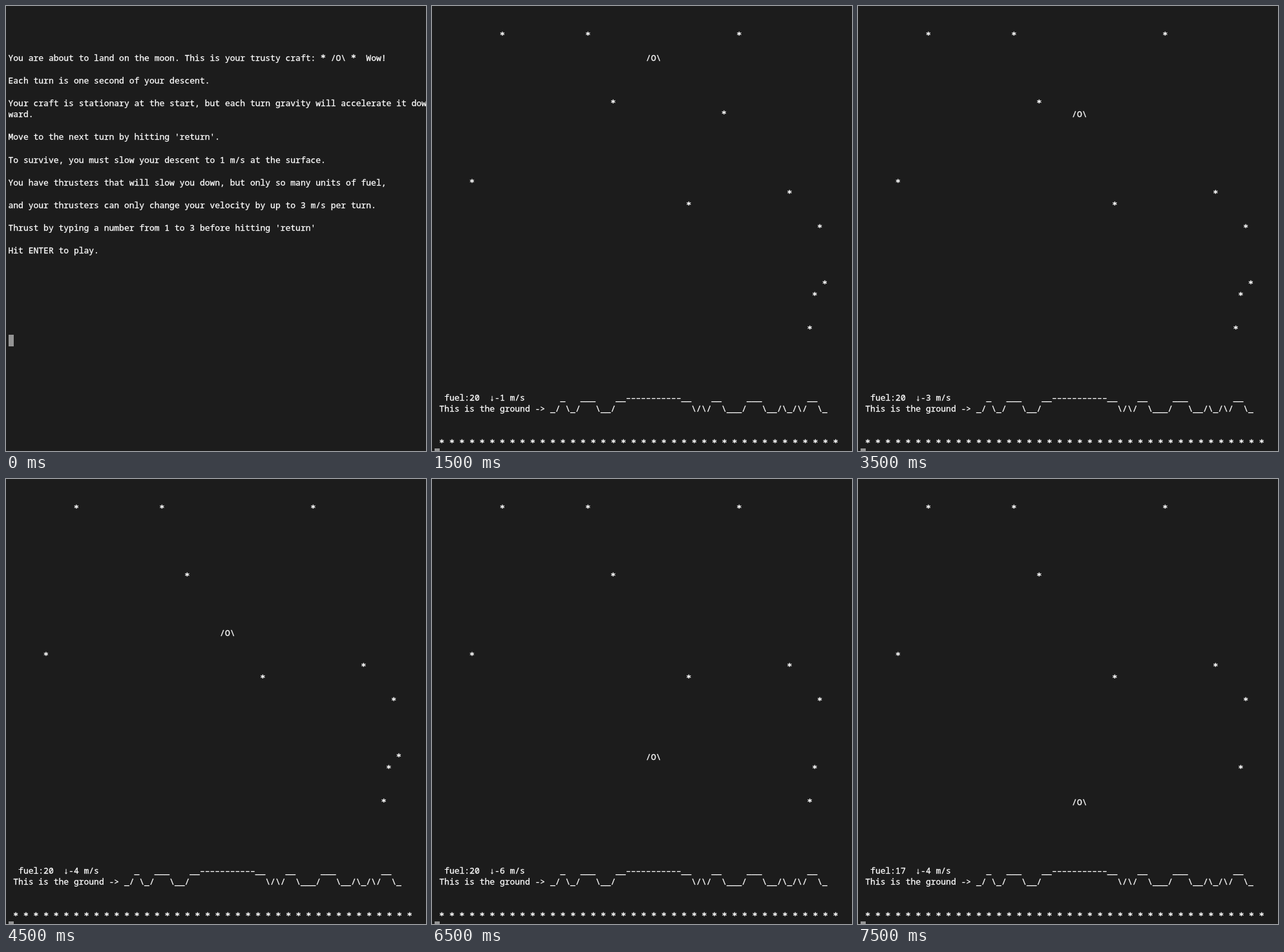
An HTML page that plays this animation: 650 by 689 pixels, repeating every 8 s.

```html
<!DOCTYPE html>
<html lang="en">
<head>
<meta charset="utf-8">
<title>Moon lander</title>
<style>
  html, body { margin: 0; width: 100%; height: 100%; overflow: hidden; background: #1c1c1c; }
  #stage { position: absolute; inset: 0; overflow: hidden; contain: strict; }
  #screen {
    position: absolute; inset: 1.6px 0 0 3.5px; margin: 0; overflow: hidden;
    font: 500 13px/17.53px "Noto Sans Mono", "DejaVu Sans Mono", monospace;
    font-variant-ligatures: none;
    -webkit-text-stroke: .3px #fff;
    color: #fff; white-space: pre;
  }
  /* heavy six-pointed asterisk */
  #screen b {
    position: relative; top: -1px;
    font: bold 13px/0 "DejaVu Sans Mono", monospace; letter-spacing: -.026px;
  }
  #cursor { position: absolute; width: 8px; height: 17.5px; background: #949494; }
</style>
</head>
<body>
<div id="stage">
  <div id="cursor"></div>
  <pre id="screen"></pre>
</div>
<script>
const LOOP = 8000, COL = 7.8, ROW = 17.53, ROWS = 39;
const screenEl = document.getElementById('screen');
const cursor = document.getElementById('cursor');

const intro = [
  [4, 'You are about to land on the moon. This is your trusty craft: * /O\\ *  Wow!'],
  [6, 'Each turn is one second of your descent.'],
  [8, 'Your craft is stationary at the start, but each turn gravity will accelerate it dow'],
  [9, 'ward.'],
  [11, "Move to the next turn by hitting 'return'."],
  [13, 'To survive, you must slow your descent to 1 m/s at the surface.'],
  [15, 'You have thrusters that will slow you down, but only so many units of fuel,'],
  [17, 'and your thrusters can only change your velocity by up to 3 m/s per turn.'],
  [19, "Thrust by typing a number from 1 to 3 before hitting 'return'"],
  [21, 'Hit ENTER to play.']
];

// [row, column]
const stars = [
  [2, 13], [2, 30], [2, 60], [4, 36], [8, 35], [9, 57], [15, 7],
  [16, 70], [17, 50], [19, 76], [24, 77], [25, 75], [28, 74]
];
const peaks = '_   ___    __' + '–'.repeat(11) + '__    __     ___         __';
const ground = 'This is the ground -> _/ \\_/   \\__/' + ' '.repeat(15) +
  '\\/\\/  \\___/   \\__/\\_/\\/  \\_';

// One speed per turn; each adds to the craft's row.
const speeds = [0, 1, 2, 3, 4, 5, 6, 4];
const craftRows = [];
speeds.reduce((row, v) => (craftRows.push(row + v), row + v), 3);

function show(parts) {
  const lines = Array(ROWS).fill('');
  for (const [row, col, text] of parts) lines[row] = lines[row].padEnd(col) + text;
  screenEl.innerHTML = lines.join('\n').replace(/\*/g, '<b>*</b>');
}

function drawTurn(turn) {
  const v = speeds[turn];
  const fuel = turn === 7 ? 17 : 20;
  const passed = craftRows.slice(0, turn + 1);
  show([
    ...stars.filter(([row]) => !passed.includes(row)).map(([row, col]) => [row, col, '*']),
    [craftRows[turn], 42, '/O\\'],
    [34, 2, 'fuel:' + fuel],
    [34, 11, (v ? '↓-' : '  ') + v + ' m/s'],
    [34, 25, peaks],
    [35, 1, ground],
    [38, 1, '* '.repeat(40)]
  ]);
}

function placeCursor(t) {
  const row = t < 500 ? 29 : 39;
  const typed = t >= 7300 && t < 7500;
  const hidden = t >= 6300 && t < 6500;
  cursor.style.left = 4 + (typed ? COL : 0) + 'px';
  cursor.style.top = 1.1 + row * ROW + 'px';
  cursor.style.visibility = hidden ? 'hidden' : 'visible';
}

let shown = null;
const start = performance.now();
function frame() {
  const t = (performance.now() - start) % LOOP;
  const turn = Math.floor((t - 500) / 1000);
  if (turn !== shown) {
    if (turn < 0) show(intro.map(([row, text]) => [row, 0, text]));
    else drawTurn(turn);
    shown = turn;
  }
  placeCursor(t);
  requestAnimationFrame(frame);
}
frame();
</script>
</body>
</html>
```
